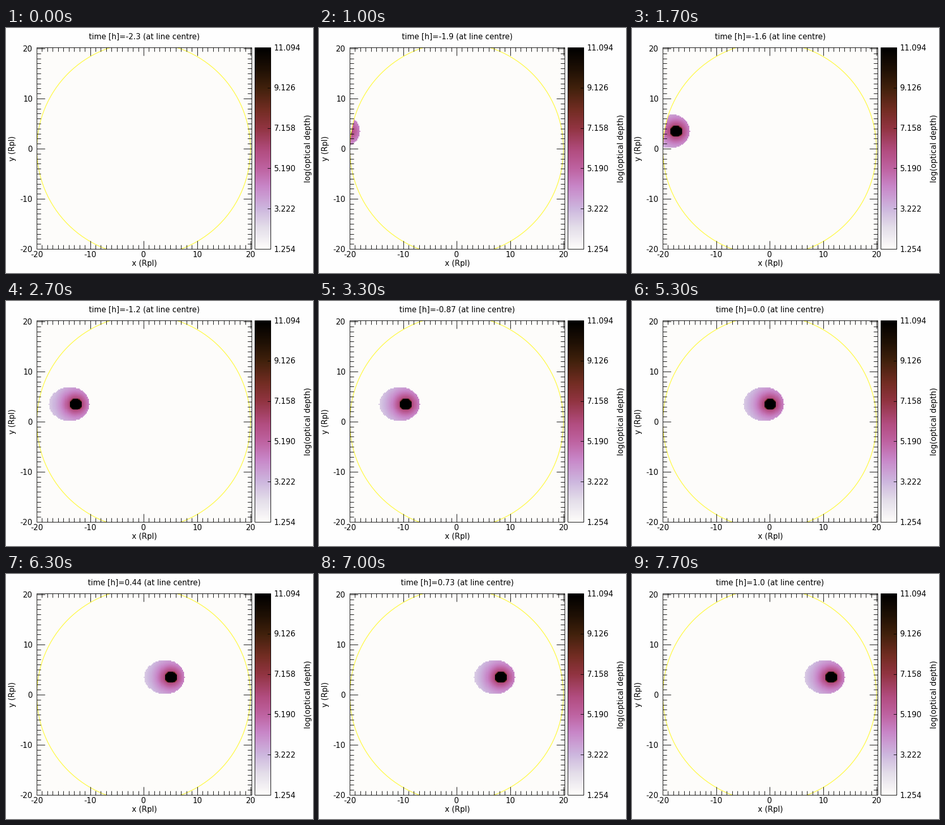
Write a matplotlib script that moves like this. It is 600 px wide and 479 px high and loops after 8 s.

```python
import math

import matplotlib.pyplot as plt
import numpy as np
from matplotlib.animation import FuncAnimation
from matplotlib.colors import LinearSegmentedColormap
from matplotlib.patches import Circle, Rectangle

WIDTH, HEIGHT, DPI = 600, 479, 64
PT = 72 / DPI                      # points per pixel
LEFT, RIGHT, TOP, BOTTOM = 60, 480, 38, 432
BAR_LEFT, BAR_RIGHT = 486, 517
CELLS, CELL = 201, 0.2             # map resolution and cell size in Rpl
TICKS, STEPS, TICK_MS = 80, 24, 100
TRANSIT_STEP, STEP_HOURS, STEP_CELLS = 16, 0.1455, 8.05
TAU_MIN, TAU_LIMB, TAU_MAX = 1.254, 8.0, 11.094

depth_map = LinearSegmentedColormap.from_list("depth", [
    (0.00, "#fdfcfa"), (0.107, "#e3dde9"), (0.20, "#cdb6de"),
    (0.31, "#c886c8"), (0.40, "#be62a0"), (0.487, "#b24d80"),
    (0.60, "#913441"), (0.69, "#732d23"), (0.80, "#41210c"),
    (0.89, "#201105"), (1.00, "#000000")])

plt.rcParams["font.family"] = "DejaVu Sans"
fig = plt.figure(figsize=(WIDTH / DPI, HEIGHT / DPI), dpi=DPI, facecolor="#fefefe")
ax = fig.add_axes([0, 0, 1, 1])
ax.axis("off")


def px(x):
    return 269 + 10.45 * x


def py(y):
    return 236 - 9.8 * y


def label(x, y, text, ha="center", va="baseline", **kwargs):
    return ax.text(x, y, text, ha=ha, va=va, fontsize=14.9 * PT, color="black", **kwargs)


def box(left, right):
    ax.add_patch(Rectangle((left, TOP), right - left, BOTTOM - TOP,
                           fill=False, ec="black", lw=PT, zorder=4))


def draw_ticks():
    style = dict(colors="black", lw=PT, zorder=4)
    for v in range(-20, 21):
        size = 16 if v % 10 == 0 else 8
        x, y = px(v), py(v)
        ax.vlines([x, x], [TOP, BOTTOM - size], [TOP + size, BOTTOM], **style)
        ax.hlines([y, y], [LEFT, RIGHT - size], [LEFT + size, RIGHT], **style)
        if v % 10 == 0:
            label(x, 448.5, str(v))
            label(52, y + 5.5, str(v), ha="right")
    for i in range(6):
        y = BOTTOM + (TOP - BOTTOM) * i / 5
        tau = TAU_MIN + (TAU_MAX - TAU_MIN) * i / 5
        ax.hlines(y, BAR_RIGHT - 6, BAR_RIGHT, **style)
        label(523.5, y + 5.5, f"{tau:.3f}", ha="left")


rows, cols = np.mgrid[0:CELLS, 0:CELLS]
on_star = np.hypot(cols - 99.5, rows - 99.5) * CELL <= 20


def optical_depth(step):
    """Opaque planet inside an egg-shaped cloud, seen only against the star."""
    dx = cols - 100 - math.ceil((step - TRANSIT_STEP) * STEP_CELLS)
    dy = rows - 117
    r = np.hypot(dx, dy) * CELL
    half_width = np.where(dx > -5, 18, 20)
    cloud = ((dx + 5) / half_width) ** 2 + (dy / 16.8) ** 2 <= 1
    tau = np.where(cloud, 6.7 - 5.7 * np.log10(np.maximum(r, 1)), TAU_MIN)
    tau[r < 1.19] = TAU_LIMB
    tau[r <= 1.08] = TAU_MAX
    return np.where(on_star, tau, TAU_MIN)


scale = dict(cmap=depth_map, vmin=TAU_MIN, vmax=TAU_MAX, aspect="auto")
sky = ax.imshow(optical_depth(0), origin="lower", interpolation="nearest",
                extent=(LEFT, RIGHT, BOTTOM, TOP), **scale)
ax.imshow(np.linspace(TAU_MAX, TAU_MIN, 256)[:, None],
          extent=(BAR_LEFT, BAR_RIGHT, BOTTOM, TOP), **scale)
ax.set_xlim(0, WIDTH)
ax.set_ylim(HEIGHT, 0)

star = Circle((269, 236.6), 208.8, fill=False, ec="#fffa50", lw=1.5 * PT, zorder=3)
ax.add_patch(star)
star.set_clip_path(Rectangle((LEFT, TOP), RIGHT - LEFT, BOTTOM - TOP,
                             transform=ax.transData))
box(LEFT, RIGHT)
box(BAR_LEFT, BAR_RIGHT)
draw_ticks()
label(270, 464.5, "x (Rpl)")
label(13, 235.5, "y (Rpl)", va="center", rotation=90)
label(590, 236, "log(optical depth)", va="center", rotation=90)
title = label(270, 21.5, "")


def update(tick):
    step = (tick * 3 + 1) * STEPS // (3 * TICKS)
    hours = (step - TRANSIT_STEP) * STEP_HOURS
    sky.set_data(optical_depth(step))
    title.set_text(f"time [h]={hours:#.2g} (at line centre)")
    return sky, title


anim = FuncAnimation(fig, update, frames=TICKS, interval=TICK_MS, repeat=True)
plt.show()
```
